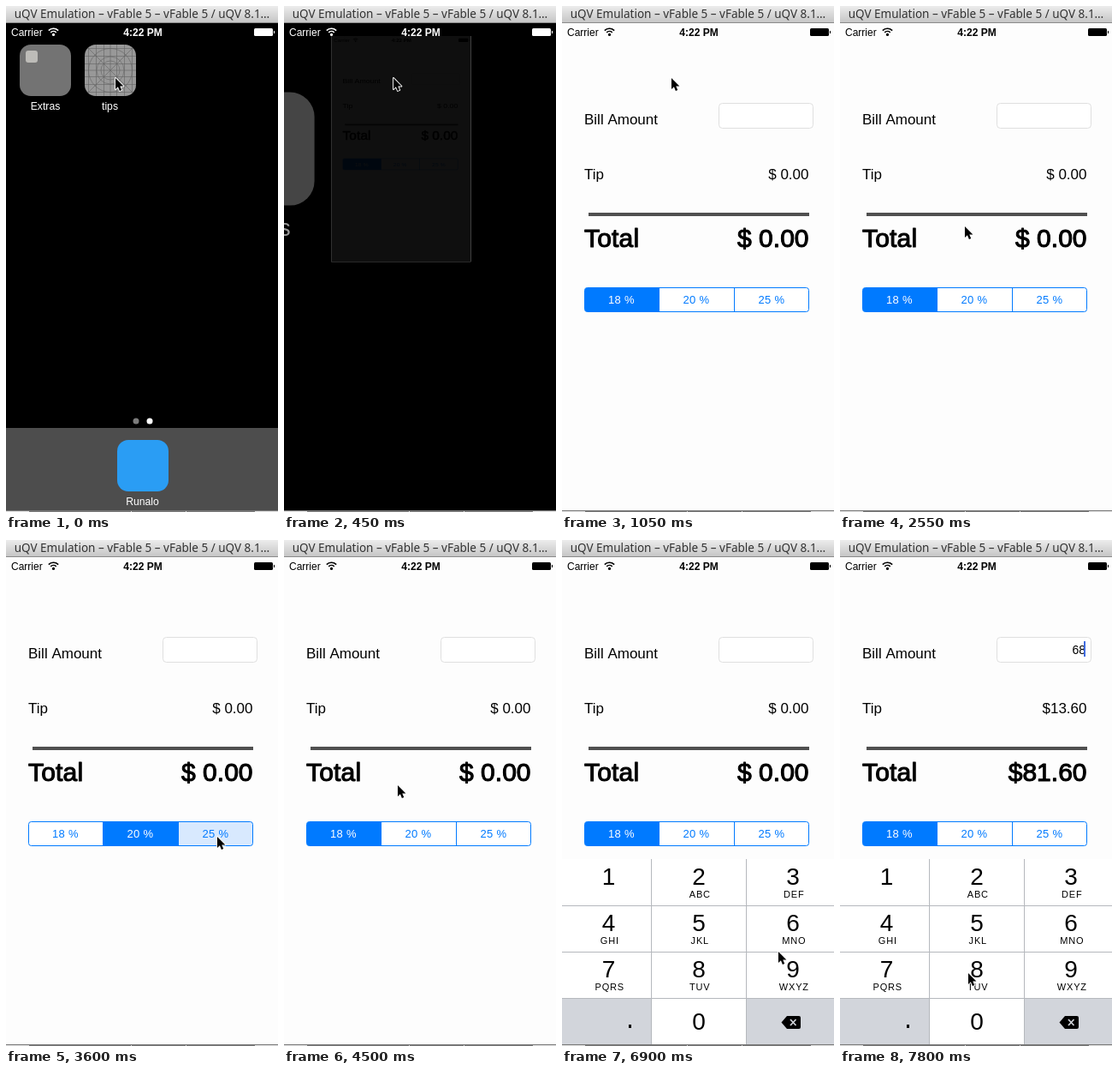
Recreate the animation shown at these times as an HTML page with a canvas. Size 318 px wide and 590 px high, loop 8 s.

```html
<!DOCTYPE html>
<html lang="en">
<head>
<meta charset="utf-8">
<style>
html, body { margin: 0; width: 100%; height: 100%; overflow: hidden; background: #fff; }
canvas { display: block; }
</style>
</head>
<body>
<canvas id="stage" width="318" height="590"></canvas>
<script>
const ctx = document.getElementById('stage').getContext('2d');
const LOOP = 8000, STEP = 150;
const SANS = '"Liberation Sans", sans-serif';
const BLUE = '#007aff', KEY_GRAY = '#d2d5db';

// Pointer tip: [time, x, y]
const POINTER = [
  [0, 127, 82], [2250, 127, 82], [2400, 131, 118], [2550, 145, 255], [2700, 150, 347],
  [3000, 165, 348], [3150, 246, 344], [3750, 246, 344], [3900, 185, 343], [4050, 75, 342],
  [4200, 72, 343], [4350, 90, 326], [4500, 132, 284], [4650, 185, 205], [4800, 237, 131],
  [6000, 237, 131], [6150, 232, 200], [6300, 207, 360], [6450, 177, 505], [6600, 186, 541],
  [6750, 218, 520], [6900, 252, 478], [7050, 264, 452], [7350, 264, 452], [7500, 238, 466],
  [7650, 172, 496], [7800, 149, 503], [8000, 149, 503]
];

const clamp = v => Math.max(0, Math.min(1, v));
const mix = (a, b, p) => a + (b - a) * p;

function pointerAt(t) {
  const i = POINTER.findIndex(k => k[0] > t);
  const [t0, x0, y0] = POINTER[i - 1], [t1, x1, y1] = POINTER[i];
  const p = (t - t0) / (t1 - t0);
  return [mix(x0, x1, p), mix(y0, y1, p)];
}

function rect(x, y, w, h, color) {
  ctx.fillStyle = color;
  ctx.fillRect(x, y, w, h);
}

function round(x, y, w, h, r, fill, stroke) {
  ctx.beginPath();
  ctx.roundRect(x, y, w, h, r);
  if (fill) { ctx.fillStyle = fill; ctx.fill(); }
  if (stroke) { ctx.strokeStyle = stroke; ctx.lineWidth = 1; ctx.stroke(); }
}

function dot(x, y, r, color) {
  ctx.beginPath();
  ctx.arc(x, y, r, 0, 7);
  ctx.fillStyle = color;
  ctx.fill();
}

function text(str, x, y, size, { color = '#000', align = 'left', weight = 400, family = SANS, spacing = 0, thicken = 0 } = {}) {
  ctx.font = `${weight} ${size}px ${family}`;
  ctx.letterSpacing = spacing + 'px';
  ctx.textAlign = align;
  ctx.fillStyle = ctx.strokeStyle = color;
  ctx.fillText(str, x, y);
  if (thicken) { ctx.lineWidth = thicken; ctx.lineJoin = 'round'; ctx.strokeText(str, x, y); }
}

function statusBar(color) {
  text('Carrier', 6, 35, 12, { color });
  text('4:22 PM', 160, 35, 12, { color, align: 'center', weight: 700 });
  ctx.strokeStyle = color;
  ctx.lineWidth = 1.6;
  for (const r of [4.5, 7.8]) {
    ctx.beginPath();
    ctx.arc(55.5, 34, r, -Math.PI * 0.76, -Math.PI * 0.24);
    ctx.stroke();
  }
  dot(55.5, 33.4, 1.6, color);
  round(290, 26, 22, 9, 1.5, color);
  rect(313, 29, 1, 3, color);
}

function templateIcon(x, y, pressed) {
  ctx.save();
  round(x, y, 60, 60, 13, '#989898');
  ctx.clip();
  ctx.strokeStyle = '#646464';
  ctx.lineWidth = 0.6;
  ctx.beginPath();
  for (const d of [4.5, 13.5, 22.5, 30, 37.5, 46.5, 55.5]) {
    ctx.moveTo(x + d, y); ctx.lineTo(x + d, y + 60);
    ctx.moveTo(x, y + d); ctx.lineTo(x + 60, y + d);
  }
  ctx.moveTo(x, y); ctx.lineTo(x + 60, y + 60);
  ctx.moveTo(x + 60, y); ctx.lineTo(x, y + 60);
  for (const r of [11, 16, 25.5]) {
    ctx.moveTo(x + 30 + r, y + 30);
    ctx.arc(x + 30, y + 30, r, 0, 7);
  }
  ctx.stroke();
  if (pressed) rect(x, y, 60, 60, 'rgba(0,0,0,.5)');
  ctx.restore();
}

function homeScreen(pressed) {
  const label = { color: '#fff', align: 'center' };
  round(16, 45, 60, 60, 13, '#737373');
  round(23, 52, 14, 14, 3, '#bdbcb8');
  templateIcon(92, 45, pressed);
  text('Extras', 46, 121, 12.2, label);
  text('tips', 121.5, 121, 12.2, label);
  dot(152, 484, 3.5, '#7c7c7c');
  dot(168, 484, 3.5, '#fff');
  rect(0, 492, 318, 96, '#4d4d4d');
  round(130, 506, 60, 60, 13, '#2a9df4');
  text('Runalo', 159.5, 582, 12.2, label);
}

function segments(selected, pressed) {
  ctx.save();
  round(26.5, 328.5, 262, 28, 4, '#fff');
  ctx.clip();
  const edges = [26, 113.5, 201.5, 289];
  ['18 %', '20 %', '25 %'].forEach((label, i) => {
    const x = edges[i], w = edges[i + 1] - x;
    if (i === selected) rect(x, 328, w, 29, BLUE);
    else if (i === pressed) rect(x, 328, w, 29, '#d8e9fe');
    if (i) rect(Math.floor(x), 328, 1, 29, BLUE);
    text(label, [69.5, 157, 245][i], 347, 13, { color: i === selected ? '#fff' : BLUE, align: 'center', spacing: 0.3 });
  });
  ctx.restore();
  round(26.5, 328.5, 262, 28, 3, null, BLUE);
}

function keyboard(offset, pressedKey) {
  ctx.save();
  ctx.translate(0, offset);
  rect(0, 372, 318, 216, '#fff');
  rect(0, 534, 104, 54, KEY_GRAY);
  rect(216, 534, 102, 54, KEY_GRAY);
  if (pressedKey === 6) rect(216, 427, 102, 53, KEY_GRAY);
  for (const y of [426, 480, 534]) rect(0, y, 318, 1, '#b5b8bd');
  for (const x of [104, 215]) rect(x, 372, 1, 216, '#b5b8bd');
  const letters = ['', 'ABC', 'DEF', 'GHI', 'JKL', 'MNO', 'PQRS', 'TUV', 'WXYZ'];
  letters.forEach((word, i) => {
    const x = [54.5, 160, 270][i % 3], y = 402 + 54 * Math.floor(i / 3);
    text(i + 1, x, y, 28, { align: 'center' });
    text(word, x + 1.3, y + 15, 11, { align: 'center', spacing: 0.8 });
  });
  text('0', 160, 571, 28, { align: 'center' });
  rect(78, 565, 3, 4, '#000');

  ctx.beginPath();
  ctx.moveTo(256.5, 562.5);
  ctx.lineTo(263, 555);
  ctx.lineTo(277, 555);
  ctx.quadraticCurveTo(279, 555, 279, 557);
  ctx.lineTo(279, 568);
  ctx.quadraticCurveTo(279, 570, 277, 570);
  ctx.lineTo(263, 570);
  ctx.fillStyle = '#000';
  ctx.fill();
  ctx.beginPath();
  ctx.moveTo(267, 559); ctx.lineTo(273.5, 566);
  ctx.moveTo(273.5, 559); ctx.lineTo(267, 566);
  ctx.strokeStyle = KEY_GRAY;
  ctx.lineWidth = 1.7;
  ctx.stroke();
  ctx.restore();
}

function caretAlpha(t) {
  if (t < 5100) return 0;
  if (t < 5700 || t >= 7050) return 1;
  const phase = (t - 4950) % 900;
  return phase < 300 ? 0 : phase < 750 ? 1 : 0.5;
}

function tipApp(t) {
  rect(0, 20, 318, 568, '#fdfdfd');
  statusBar('#000');
  const typed = t >= 7800 ? '68' : t >= 7350 ? '6' : '';
  const money = n => typed ? '$' + n.toFixed(2) : '$ 0.00';
  const bill = Number(typed), tip = bill * 0.2;
  text('Bill Amount', 26, 138, 17);
  round(183.5, 113.5, 110, 29, 4, '#fff', '#dfdfdf');
  text(typed, 287, 133, 14, { align: 'right' });
  ctx.globalAlpha *= caretAlpha(t);
  rect(285, 118, 2, 18, '#3f6be0');
  ctx.globalAlpha = 1;
  text('Tip', 26, 202, 17);
  text(money(tip), 288.5, 202, 17, { align: 'right' });
  rect(31, 241, 258, 4, '#505050');
  text('Total', 26, 281, 30, { thicken: 1.1, spacing: 0.2 });
  text(money(bill + tip), 288.5, 281, 30, { align: 'right', thicken: 1.1 });

  const selected = t < 3000 ? 0 : t < 3750 ? 1 : t < 4350 ? 2 : 0;
  const pressed = t === 2850 ? 1 : t === 3600 ? 2 : t === 4200 ? 0 : -1;
  segments(selected, pressed);
  if (t >= 5100) {
    const p = clamp((t - 5050) / 450);
    keyboard(216 * (1 - p) ** 3, t === 7200 ? 6 : 0);
  }
}

// The home screen zooms towards the icon while the app grows out of it
function launch(t) {
  const p = clamp((t - 300) / 375);
  if (p < 1) {
    const zoom = 1 + 3 * p;
    ctx.save();
    ctx.globalAlpha = 1 - p;
    ctx.translate(mix(122, 159, p), mix(75, 304, p));
    ctx.scale(zoom, zoom);
    ctx.translate(-122, -75);
    homeScreen(t >= 300);
    ctx.restore();
  }
  if (p > 0) {
    const x = mix(92, 0, p), y = mix(45, 20, p);
    ctx.save();
    ctx.translate(x, y);
    ctx.scale(mix(60, 318, p) / 318, mix(60, 568, p) / 568);
    ctx.translate(0, -20);
    tipApp(t);
    const light = t < 750 ? 0.06 : t < 900 ? 0.315 : 0.75;
    rect(0, 20, 318, 568, `rgba(0,0,0,${1 - light})`);
    ctx.restore();
  }
  if (p < 1) statusBar('#fff');
}

function windowFrame() {
  const shade = ctx.createLinearGradient(0, 0, 0, 19);
  shade.addColorStop(0, '#ececec');
  shade.addColorStop(1, '#c6c6c6');
  rect(0, 0, 318, 19, shade);
  rect(0, 19, 318, 1, '#8a8a8a');
  text('uQV Emulation – vFable 5 – vFable 5 / uQV 8.1…', 159, 14, 13.5,
    { color: '#333', align: 'center', family: '"Noto Sans", sans-serif' });
  rect(0, 588, 318, 1, '#777');
  rect(0, 589, 318, 1, '#e4e4e4');
  rect(27, 589, 119, 1, '#777');
  rect(147, 589, 63, 1, '#777');
  rect(211, 589, 80, 1, '#777');
}

function pointer(x, y) {
  ctx.save();
  ctx.translate(x + 0.5, y + 1.5);
  ctx.scale(0.9, 0.9);
  ctx.beginPath();
  ctx.moveTo(0.5, 0.5);
  [[0.5, 15], [3.8, 12], [6, 17.2], [8.6, 16.1], [6.4, 11.2], [11, 11.2]].forEach(p => ctx.lineTo(...p));
  ctx.closePath();
  ctx.lineJoin = 'round';
  ctx.lineWidth = 2;
  ctx.strokeStyle = '#fff';
  ctx.stroke();
  ctx.fillStyle = '#000';
  ctx.fill();
  ctx.restore();
}

function draw() {
  const now = performance.now() % LOOP;
  const t = Math.floor(now / STEP) * STEP;
  rect(0, 0, 318, 590, '#000');
  ctx.save();
  ctx.beginPath();
  ctx.rect(0, 20, 318, 568);
  ctx.clip();
  if (t < 1050) launch(t);
  else tipApp(t);
  ctx.restore();
  windowFrame();
  pointer(...pointerAt(t));
  requestAnimationFrame(draw);
}
draw();
</script>
</body>
</html>
```
